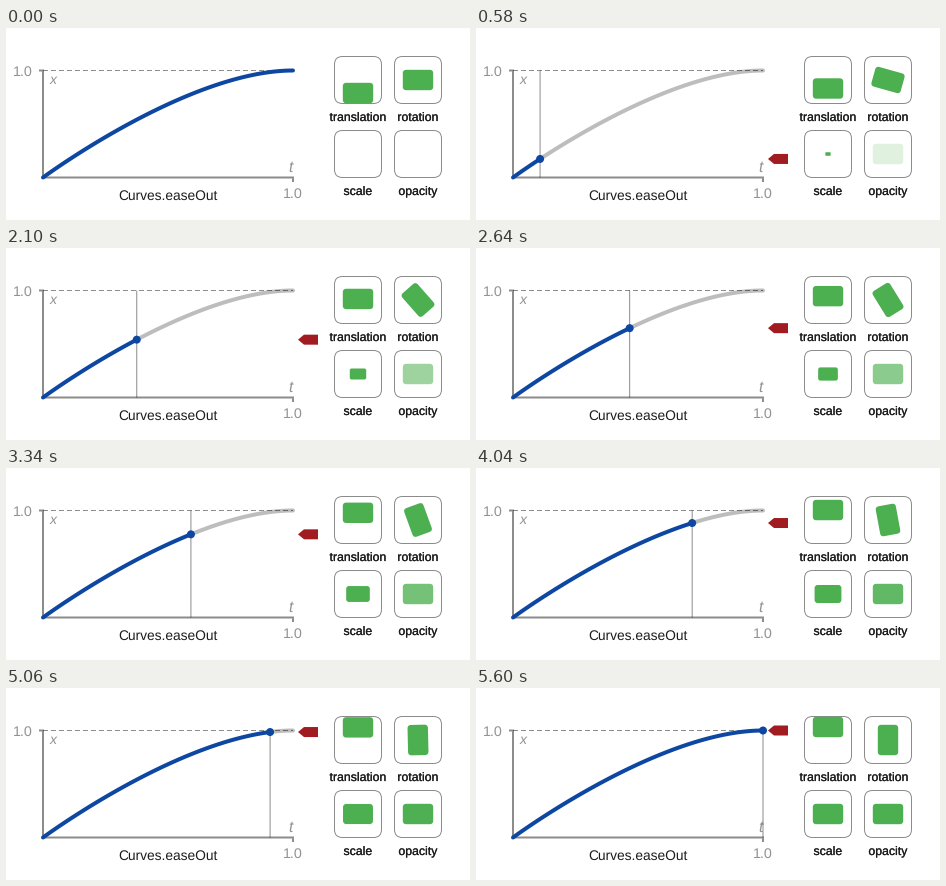
Animation of 464x192 px, one loop 5620 ms. Source, as a matplotlib script:

```python
import numpy as np
import matplotlib.pyplot as plt
from matplotlib.animation import FuncAnimation
from matplotlib.patches import Circle, FancyBboxPatch, Polygon
from matplotlib.patheffects import withStroke
from matplotlib.transforms import Affine2D

W, H, DPI = 464, 192, 64
PT = 72 / DPI
TICK, TICKS, STEPS = 20, 281, 120

X0, X1, Y0, Y1 = 37, 287, 149.5, 42.5
BLUE, GREEN, RED = "#0d47a1", "#4caf50", "#a01c20"
FAINT, TRACK = (0, 0, 0, 0.45), (0, 0, 0, 0.26)
GRAY, INK = "#929292", "#1c1c1c"

plt.rcParams["font.family"] = "Liberation Sans"
plt.rcParams["text.hinting"] = "none"
plt.rcParams["path.snap"] = False

fig = plt.figure(figsize=(W / DPI, H / DPI), dpi=DPI, facecolor="white")
ax = fig.add_axes([0, 0, 1, 1])
ax.set_xlim(0, W)
ax.set_ylim(H, 0)
ax.axis("off")


def line(xs, ys, color, width, z, **kw):
    return ax.plot(xs, ys, color=color, lw=width * PT, zorder=z, **kw)[0]


def label(x, y, text, size, color=INK, medium=False, **kw):
    t = ax.text(x, y, text, fontsize=size * PT, color=color, ha="center",
                va="baseline", **kw)
    if medium:
        t.set_path_effects([withStroke(linewidth=0.2 * PT, foreground=color)])


def rounded(x, y, w, h, r, **kw):
    style = f"round,pad=0,rounding_size={r}"
    return ax.add_patch(FancyBboxPatch((x, y), w, h, boxstyle=style, **kw))


def ease_out(s):
    """Cubic Bezier (0, 0, 0.58, 1) by its own parameter."""
    return 1.74 * s**2 - 0.74 * s**3, 3 * s**2 - 2 * s**3


def curve(a, b):
    t, v = ease_out(np.linspace(a, b, 100))
    return X0 + (X1 - X0) * t, Y0 + (Y1 - Y0) * v


# Plot frame
line([X0, X0, X1 + 1], [41.5, Y0, Y0], FAINT, 2, 2, solid_joinstyle="miter",
     solid_capstyle="butt")
line([33, 36], [Y1, Y1], FAINT, 2, 2, solid_capstyle="butt")
line([X1, X1], [Y0 + 1, 154], FAINT, 2, 2, solid_capstyle="butt")
line([X0, X1], [Y1, Y1], FAINT, 1, 1, dashes=(5, 3), dash_capstyle="butt")
label(17, 47.8, "1.0", 14.3, GRAY)
label(287, 169.5, "1.0", 14.3, GRAY)
label(47, 56, "x", 14, GRAY, style="italic")
label(284.5, 144, "t", 15.5, GRAY, style="italic")
label(161.7, 172, "Curves.easeOut", 13.7)

# Moving plot parts
guide = line([], [], FAINT, 1, 3, solid_capstyle="butt")
rest = line([], [], TRACK, 4, 4, solid_capstyle="round")
done = line([], [], BLUE, 4, 5, solid_capstyle="round")
dot = ax.add_patch(Circle((X0, Y0), 4, fc=BLUE, ec="none", zorder=6))
arrow = np.array([(292, 0), (298, -5), (312, -5), (312, 5), (298, 5)])
marker = ax.add_patch(Polygon(arrow, fc=RED, ec="none", zorder=6))

# Sample tiles
tiles = {"translation": (352, 52), "rotation": (412, 52),
         "scale": (352, 126), "opacity": (412, 126)}
cards = {}
for name, (cx, cy) in tiles.items():
    rounded(cx - 23.5, cy - 23.5, 47, 47, 8, fc="none", ec=FAINT,
            lw=PT, zorder=2)
    cards[name] = rounded(-15.2, -10.2, 30.4, 20.4, 3.5, fc=GREEN, ec="none",
                          zorder=3)
    label(cx - 0.2, cy + 41, name, 12.3, INK, medium=True)


def place(name, dy=0, angle=0, scale=1):
    cx, cy = tiles[name]
    move = Affine2D().scale(scale).rotate_deg(angle).translate(cx, cy + dy)
    cards[name].set_transform(move + ax.transData)


GRID = np.linspace(0, 1, 4001)
GRID_T = ease_out(GRID)[0]


def update(tick):
    # Each run of three steps is held for 20, 100 and 20 ms.
    run, part = divmod(tick, 7)
    step = 3 * run + (part > 0) + (part > 5)
    t = step / STEPS
    s = np.interp(t, GRID_T, GRID)
    v = ease_out(s)[1]
    x, y = X0 + (X1 - X0) * t, Y0 + (Y1 - Y0) * v

    idle = step == 0
    done.set_data(*curve(0, 1 if idle else s))
    rest.set_data(*curve(s, 1))
    rest.set_visible(0 < step < STEPS)
    guide.set_data([x, x], [Y1, Y0])
    dot.center = x, y
    marker.set_xy(arrow + (0, y))
    for artist in (guide, dot, marker):
        artist.set_visible(not idle)

    place("translation", dy=13 - 26 * v)
    place("rotation", angle=90 * v)
    place("scale", scale=max(v, 1e-3))
    cards["scale"].set_visible(not idle)
    place("opacity")
    cards["opacity"].set_alpha(v)
    return []


anim = FuncAnimation(fig, update, frames=TICKS, interval=TICK, repeat=True,
                     repeat_delay=0, blit=False)
plt.show()
```
